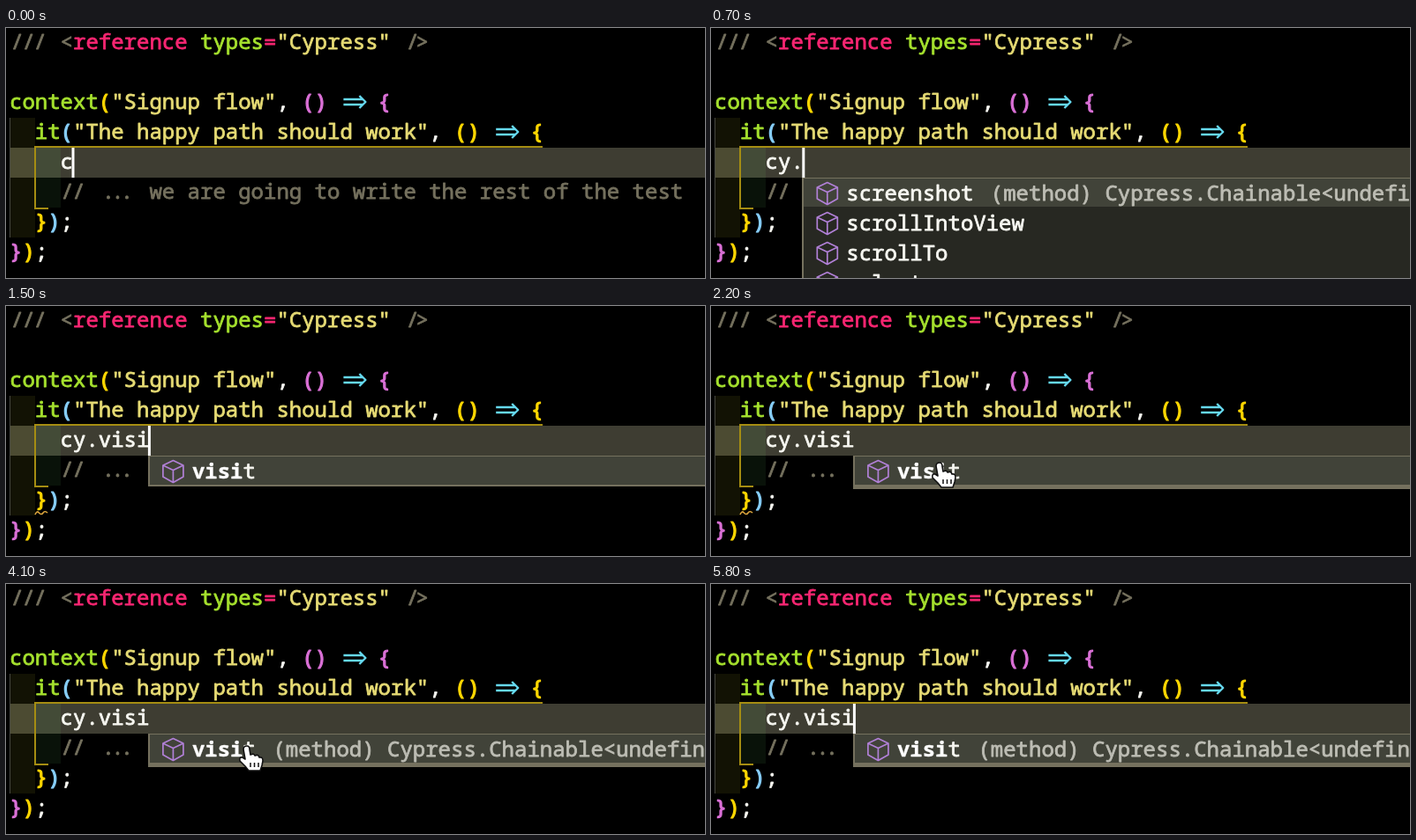
Recreate the animation shown at these times as an HTML page with a canvas. Size 792x284 px, loop 5900 ms.

```html
<!DOCTYPE html>
<html>
<head>
<meta charset="utf-8">
<style>
html, body { margin: 0; width: 100%; height: 100%; overflow: hidden; background: #000; }
canvas { display: block; }
</style>
</head>
<body>
<canvas id="stage" width="792" height="284"></canvas>
<script>
const ctx = document.getElementById('stage').getContext('2d');
const LOOP = 5900, CH = 14.4, LINE = 34, LEFT = 4;
const GREY = '#75715e', PINK = '#f92672', GREEN = '#a6e22e', STRING = '#e6db74', WHITE = '#f8f8f2',
  GOLD = '#ffd700', ORCHID = '#da70d6', BLUE = '#87cefa', CYAN = '#66d9ef';

const colX = col => LEFT + col * CH;

function rect(x, y, w, h, color) {
  ctx.fillStyle = color;
  ctx.fillRect(x, y, w, h);
}

// A thin outline of the same colour gives the strokes a medium weight
function text(str, x, y, color, weight = 400, outline = 0.8) {
  ctx.font = `${weight} 24px "Noto Sans Mono", "DejaVu Sans Mono", monospace`;
  ctx.fillStyle = ctx.strokeStyle = color;
  ctx.lineWidth = outline;
  ctx.lineJoin = 'round';
  ctx.fillText(str, x, y);
  ctx.strokeText(str, x, y);
}

// Draws [string, color, string, color, ...] along one code line
function code(line, col, ...parts) {
  for (let i = 0; i < parts.length; i += 2) {
    const bracket = /^[(){}]+$/.test(parts[i]);
    text(parts[i], colX(col), line * LINE + 24, parts[i + 1], 400, bracket ? 1.2 : 0.8);
    col += parts[i].length;
  }
}

// Ligature: glyphs pulled together around the middle of their cells
function tight(str, line, col, step) {
  const n = str.length, mid = colX(col + n / 2);
  [...str].forEach((c, i) =>
    text(c, mid + (i - (n - 1) / 2) * step - CH / 2, line * LINE + 24, GREY));
}

function stroke(path, x, y, color, width) {
  ctx.save();
  ctx.translate(x, y);
  ctx.strokeStyle = color;
  ctx.lineWidth = width;
  ctx.lineJoin = 'round';
  ctx.stroke(path);
  ctx.restore();
}

const arrow = new Path2D('M4 -3H26M4 3H26M22 -7L29 0L22 7');
const cube = new Path2D('M0 -12.5L11.5 -7V6L0 12.5L-11.5 6V-7ZM-11.5 -7L0 -1.5L11.5 -7M0 -1.5V12.5');
const wave = new Path2D('M0 2Q2 -3 4.5 0T9 0T14 0');
const hand = new Path2D('M-4 4Q-4 0 0 0Q3 0 3 4L4 10Q8 8 9 11Q13 9 14 13Q18 12 18 17L17 22L15 28H2' +
  'L-2 23L-8 17Q-9 12 -5 13L-2 15Z');
const knuckles = new Path2D('M4 19V24M8.5 19V24M13 19V24');

function drawCode(typed, wavy) {
  rect(0, 0, 792, 284, '#000');
  rect(4, 136, 788, 34, '#3e3d32');
  rect(5, 102, 28, 136, 'rgba(255,255,64,.07)');
  rect(33, 136, 29, 68, 'rgba(127,255,127,.07)');
  rect(4, 102, 1, 136, '#464741');
  const scope = '#a58d12';
  rect(33, 134, 575, 2, scope);
  rect(32, 134, 2, 71, scope);
  rect(32, 204, 16, 2, scope);

  tight('///', 0, 0, 13);
  code(0, 4, '<', GREY, 'reference', PINK, ' types', GREEN, '=', PINK, '"Cypress"', STRING);
  tight('/>', 0, 31.1, 11);
  code(2, 0, 'context', GREEN, '(', GOLD, '"Signup flow"', STRING, ', ', WHITE, '()', ORCHID,
    '    ', WHITE, '{', ORCHID);
  code(3, 2, 'it', GREEN, '(', BLUE, '"The happy path should work"', STRING, ', ', WHITE, '()', GOLD,
    '    ', WHITE, '{', GOLD);
  stroke(arrow, colX(26), 84, CYAN, 2.4);
  stroke(arrow, colX(38), 118, CYAN, 2.4);
  code(4, 4, typed, WHITE);
  tight('//', 5, 4, 13);
  tight('...', 5, 7, 10.5);
  code(5, 11, 'we are going to write the rest of the test', GREY);
  code(6, 2, '}', GOLD, ')', BLUE, ';', WHITE);
  code(7, 0, '}', ORCHID, ')', GOLD, ';', WHITE);
  if (wavy) stroke(wave, 33, 235, '#d9a33c', 1.6);
}

function drawPopup(left, items, match, details, thick) {
  const x = Math.floor(left) - 1, bottom = 170 + items.length * LINE;
  rect(x, 170, 800, bottom - 170 + (thick ? 4 : 1), GREY);
  rect(x + 2, 171, 800, bottom - 172, '#272822');
  rect(x + 2, 171, 800, 32, '#414339');
  items.forEach((name, i) => {
    const y = 196 + i * LINE, tx = left + 48.5, n = match.length;
    stroke(cube, left + 27, y - 8, '#b180d7', 1.7);
    text(match, tx, y, '#fff', 800, 0.3);
    text(name.slice(n), tx + n * CH, y, WHITE);
  });
  if (details) {
    const dx = left + 68 + items[0].length * CH;
    text('(method) Cypress.Chainable<undefined>', dx, 196, '#bdbdb4');
  }
}

// [time, x, y] of the fingertip
const route = [[2000, 256, 176], [2200, 259, 178], [2500, 273, 184], [5000, 273, 184], [5400, 300, -20]];

function drawHand(t) {
  const i = route.findIndex(p => p[0] > t);
  if (i < 1) return;
  const [a, b] = [route[i - 1], route[i]], k = (t - a[0]) / (b[0] - a[0]);
  const x = a[1] + (b[1] - a[1]) * k, y = a[2] + (b[2] - a[2]) * k;
  ctx.save();
  ctx.translate(x, y);
  ctx.fillStyle = '#fff';
  ctx.fill(hand);
  ctx.restore();
  stroke(hand, x, y, '#111', 1.6);
  stroke(knuckles, x, y, '#111', 1.5);
}

const keys = [0, 200, 400, 1200, 1300, 1400, 1500];

function draw(now) {
  const t = Math.floor(now % LOOP / 100) * 100;
  const typed = 'cy.visi'.slice(0, keys.filter(k => k <= t).length);
  const end = colX(4 + typed.length);
  drawCode(typed, t >= 1400 && t < 2500);
  if (t >= 1300) drawPopup(end, ['visit'], typed.slice(3), t >= 2500, t >= 1600);
  else if (t >= 1200) drawPopup(end, ['visit', 'viewport'], 'v', false, false);
  else if (t >= 500) drawPopup(end, ['screenshot', 'scrollIntoView', 'scrollTo', 'select'], '', t >= 600, false);
  if (t < 1500 || (t - 1500) % 1000 < 500) rect(end - 1.5, 136, 3, 34, '#fff');
  drawHand(t);
  requestAnimationFrame(() => draw(performance.now() - start));
}

const start = performance.now();
draw(0);
</script>
</body>
</html>
```
